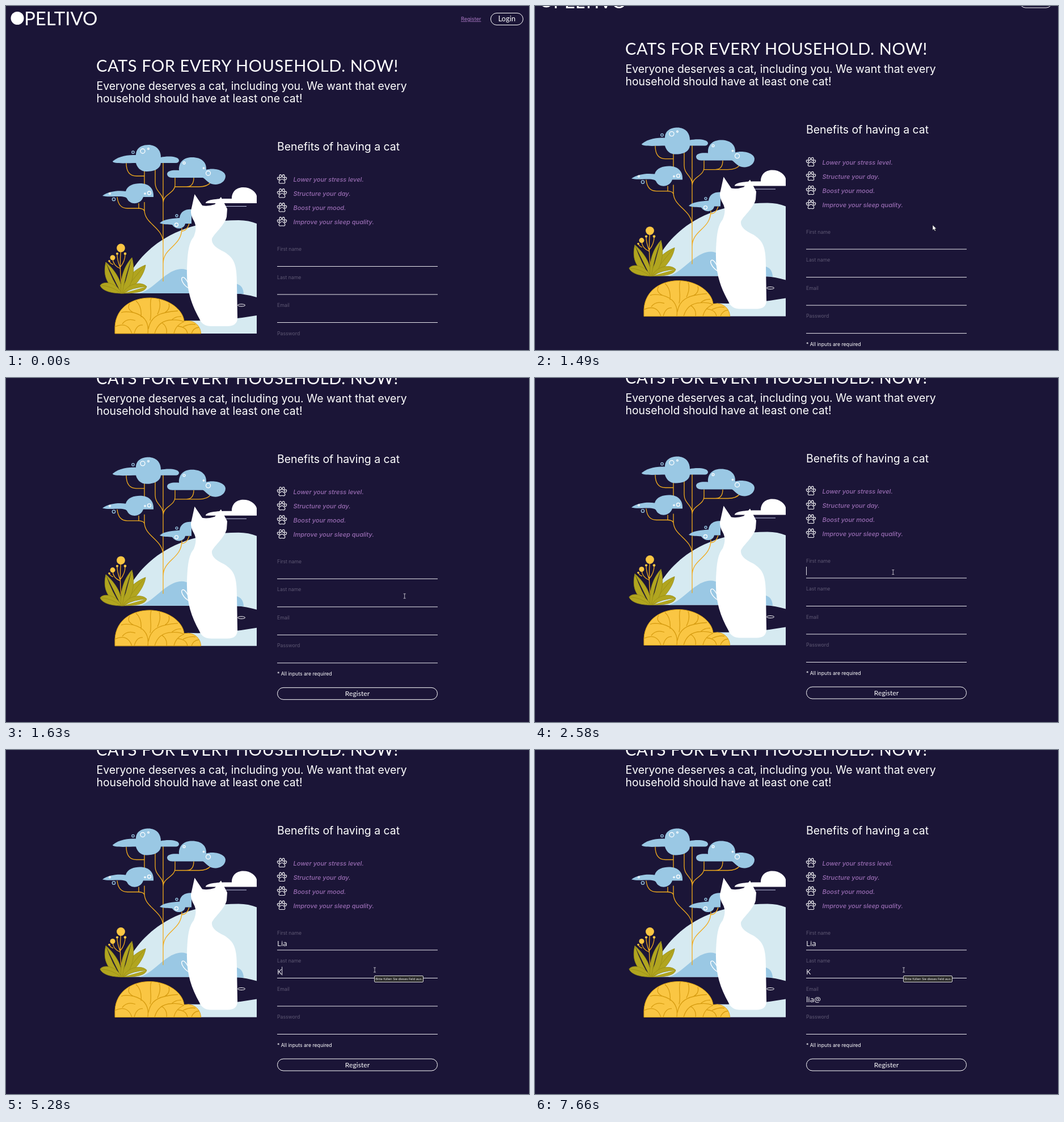
These frames come from a looping animation (922x607 px, 8 s). An HTML page:

```html
<!DOCTYPE html>
<html lang="en">
<head>
<meta charset="utf-8">
<title>Cats for every household</title>
<style>
  html, body { margin: 0; width: 100%; height: 100%; overflow: hidden; background: #1b1537; }
  svg { display: block; width: 922px; height: 607px; }
  text { font-family: Inter, "Open Sans", sans-serif; fill: #fff; }
  .round { font-family: Lato, sans-serif; }
  .typed, .tip text { font-family: "Open Sans", "Noto Sans", sans-serif; }
  .big { font-size: 19.4px; }
  .small { font-size: 8.7px; }
  .label { fill: #5f5974; }
  .benefit { font-size: 11px; font-weight: 500; font-style: italic; fill: #9a6db4; }
  .link { font-size: 9px; font-weight: 500; fill: #9a6db4; text-decoration: underline; }
  .button { text-anchor: middle; letter-spacing: .1px; }
  .typed { font-size: 13.3px; }
  .outline { fill: none; stroke: #fff; }
  .blue { fill: #9ac8e4; }
  .pale { fill: #d6eaf1; }
  .branch { fill: none; stroke: #f0aa1d; stroke-width: 1.3; }
  .vein { fill: none; stroke: #d79d12; stroke-width: 1.3; }
  .gold { fill: #fac643; }
  .leaf { fill: #b1a51f; stroke: #968b16; stroke-width: .8; }
</style>
</head>
<body>
<svg viewBox="0 0 922 607">
  <defs>
    <g id="paw" class="outline" stroke-width="1.1">
      <ellipse cx="-6.2" cy="-1" rx="1.8" ry="2.4" transform="rotate(-20 -6.2 -1)"/>
      <ellipse cx="-2.6" cy="-5.3" rx="1.9" ry="2.6"/>
      <ellipse cx="2.6" cy="-5.3" rx="1.9" ry="2.6"/>
      <ellipse cx="6.2" cy="-1" rx="1.8" ry="2.4" transform="rotate(20 6.2 -1)"/>
      <path d="M0 0C3 0 6.2 4 5.2 6.5C4.2 8.5 2 7.2 0 7.2S-4.2 8.5-5.2 6.5C-6.2 4-3 0 0 0Z"/>
    </g>
  </defs>

  <g id="page">
    <circle cx="20" cy="21.5" r="11.5" fill="#fff"/>
    <text class="round" x="32" y="34" font-size="33">PELTIVO</text>
    <text class="link" x="802" y="26">Register</text>
    <rect class="outline" x="854.5" y="12.5" width="57" height="21" rx="10.5"/>
    <text class="round button" x="883" y="27" font-size="12.8">Login</text>

    <text class="round" x="159" y="116" font-size="29" letter-spacing=".6">CATS FOR EVERY HOUSEHOLD. NOW!</text>
    <text class="big" x="159.5" y="148">Everyone deserves a cat, including you. We want that every</text>
    <text class="big" x="159.5" y="170">household should have at least one cat!</text>
    <text class="big" x="478" y="255">Benefits of having a cat</text>

    <g id="scene">
      <path class="pale" d="M205 507C215 460 270 378 410 378Q428 378 442 384V514Q425 509 405 507Z"/>
      <path class="blue" d="M235 507C262 500 282 464 310 464C330 464 345 490 350 507ZM405 490Q418 492 419 508H405Z"/>
      <path class="pale" d="M320 555Q380 557 442 546V578H320Z"/>
      <ellipse class="outline" cx="415" cy="528" rx="6.5" ry="2"/>
      <path fill="#fff" d="M352 347C356 340 380 340 398 340C398 326 408 320 418 320C432 320 440 328 442 335V348H352Z"/>
      <path d="M384 353.5H424" stroke="#c3c8e6"/>

      <path class="branch" d="M277 276V486M263 276V312C263 328 277 330 277 345M298 303V316C298 330 277 332 277 347
        M212 277Q212 300 230 300H244M244 290V318M331 303Q331 319 318 319H298M361 311Q355 319 340 319H318
        M244 346V360C244 385 277 390 277 418M196 337Q198 357 214 357H232Q243 357 244 362M234 348V357
        M310 392C310 425 277 425 277 455M323 384Q319 397 310 397"/>
      <g class="blue">
        <path d="M188 274C200 264 215 263 229 263C229 250 240 245 251 245C265 245 273 254 273 267C282 265 303 264 305 272C305 276 302 277 299 277H273C272 288 260 292 248 292C236 292 231 284 229 277C215 277 188 279 188 274Z"/>
        <path d="M284 296C285 290 295 289 305 290C304 274 315 267 328 267C345 267 354 276 353 289C365 285 386 289 387 300C387 310 377 315 369 315C357 315 352 305 347 303H293C287 303 284 300 284 296Z"/>
        <path d="M170 335C180 327 198 325 211 327C214 316 226 313 236 313C250 313 261 320 260 337H242C238 350 220 352 214 341C212 336 205 336 196 336C186 336 178 337 170 335Z"/>
        <path d="M271 383C280 375 295 375 306 374C307 362 318 358 327 359V384H316C314 394 300 396 293 386C286 385 277 386 271 383Z"/>
      </g>
      <g id="bubbles" fill="none" stroke-width="1.3"></g>

      <path class="branch" d="M203 488Q200 460 202.5 430M201 463Q189 458 188 446M201 461Q196 448 196 438M202 460Q210 450 210 438M189 456Q184 455 182 450"/>
      <g class="gold">
        <circle cx="202.5" cy="427" r="7.4"/><circle cx="188" cy="444" r="4.5"/>
        <circle cx="196" cy="437" r="2.1"/><circle cx="210" cy="437" r="2.3"/><circle cx="182" cy="450" r="1.8"/>
      </g>
      <g class="leaf">
        <path d="M202 507C170 490 173 466 176 452C190 464 206 485 204 507ZM176 452Q187 485 203 507"/>
        <path d="M207 507C225 500 244 475 246 457C230 463 207 480 204 507ZM246 457Q224 480 207 507"/>
        <path d="M203 507C200 475 212 455 222 444C229 470 222 495 207 507ZM222 444Q210 475 205 507"/>
        <path d="M203 507C190 507 170 504 166 493C172 484 195 488 204 507ZM167 493Q187 494 203 507"/>
        <path d="M206 507C215 488 240 486 248 495C246 504 230 507 206 507ZM248 495Q225 496 206 507"/>
      </g>

      <path class="gold" d="M192 578V566C194 530 225 515 253 515C285 515 312 535 314 556C330 553 343 563 343.5 578Z" stroke="#d79d12"/>
      <path class="vein" d="M250 578C253 555 240 545 225 541Q210 538 203 541M251 570C255 545 275 540 303 538M254 555C258 540 252 528 256 515
        M238 549Q240 530 229 520M225 541Q212 535 218 525M267 544Q274 530 270 518M280 541Q290 535 287 525M192 566Q215 556 222 578
        M205 561Q213 550 228 555M226 578Q230 562 241 563M262 578Q268 555 292 554Q305 553 313 557M275 559Q285 566 283 578M292 554Q300 547 309 548
        M296 578Q299 563 314 557M303 565Q318 566 320 578M312 566Q325 560 334 562M327 578Q330 568 340 567"/>

      <path class="outline" stroke-width="1.4" d="M322 498C312 492 307 481 311 479C314 477 319 484 322 491"/>
      <path fill="#fff" d="M332.5 332L327 357C325 362 326 368 329 375C337 388 335 396 331 407C322 418 320 435 319 465C318 500 326 525 341 552Q346 565 362 565H390Q408 565 408 550L407 490C407 455 402 445 385 434C370 427 362 420 363 411C366 402 385 388 389 372L390 358L379 337L368 350Q356 354 346 352Z"/>
    </g>

    <g id="benefits"></g>
    <g id="form"></g>
    <rect id="caret" width="1" height="15" fill="#e4e2ea"/>
    <text class="small" x="478" y="630.5">* All inputs are required</text>
    <rect class="outline" x="478.5" y="651.5" width="282" height="21" rx="10.5"/>
    <text class="round button" x="619.5" y="666" font-size="12">Register</text>
  </g>

  <g id="tooltip" class="tip">
    <rect x="649.5" y="398.5" width="86" height="11" rx="1.5" fill="#2b2b2b" stroke="#d8d8d8"/>
    <text x="651.3" y="406.4" font-size="5.8">Bitte füllen Sie dieses Feld aus.</text>
  </g>
  <path id="arrow" d="M0 0V9L2.2 7.2L3.8 10.6L5.4 9.9L3.9 6.6H6.6Z" fill="#fff" stroke="#111" stroke-width=".5"/>
  <path id="beam" d="M-2-4H2M-2 4H2M0-4V4" fill="none" stroke="#c9c6d0" stroke-width=".9"/>
</svg>
<script>
const LOOP = 8000, SCROLL = 106.5, ROW = 49.5, BLINK = 530;
const $ = id => document.getElementById(id);
const show = (el, on) => el.style.display = on ? '' : 'none';

$('benefits').innerHTML = ['Lower your stress level.', 'Structure your day.', 'Boost your mood.', 'Improve your sleep quality.']
  .map((line, i) => `<use href="#paw" x="486.5" y="${305.5 + 25 * i}"/>
    <text class="benefit" x="506.5" y="${310 + 25 * i}">${line}</text>`).join('');

$('form').innerHTML = ['First name', 'Last name', 'Email', 'Password']
  .map((label, i) => `<g transform="translate(0 ${ROW * i})">
    <text class="small label" x="478" y="432">${label}</text>
    <text class="typed" x="478" y="452.5"></text>
    <path d="M478 459.5H761" stroke="#e9e8ee"/></g>`).join('');
const inputs = [...document.querySelectorAll('.typed')];

const ring = color => ([x, y, r]) => `<circle cx="${x}" cy="${y}" r="${r}" stroke="${color}"/>`;
$('bubbles').innerHTML =
  [[241, 256, 4], [251, 252, 1.4], [314, 277, 2], [356.5, 295, 4], [348.5, 286, 1.2],
   [183, 331, 1.4], [252.5, 330, 3], [245, 331, 1.2], [300.5, 386, 3]].map(ring('#fff')).join('') +
  [[224, 258, 2.2], [190, 341, 2.7], [301, 370, 2]].map(ring('#9ac8e4')).join('');

// time, x, y
const pointerPath = [
  [730, 627, 553], [1080, 701, 386.5], [1500, 701, 386.5], [1630, 703, 385], [1840, 631, 342],
  [2110, 631, 342], [2180, 624, 341], [2250, 624, 341], [2320, 631, 342], [2570, 631, 342],
  [3340, 650, 384], [4150, 650, 388]
];
// time, field, its text, start of the caret blink
const typing = [
  [2110, 0, '', 2110], [3410, 0, 'L', 3410], [3620, 0, 'Li', 3410], [3820, 0, 'Lia', 3410],
  [4410, 1, '', 4410], [5280, 1, 'K', 5280], [5540, 2, '', 5540], [6070, 2, 'l', 6070],
  [6270, 2, 'li', 6070], [6400, 2, 'lia', 6070], [7330, 2, 'lia@', 6070]
];

function pointerAt(t) {
  const next = pointerPath.findIndex(p => p[0] > t);
  if (next < 0) return pointerPath.at(-1).slice(1);
  const [t0, x0, y0] = pointerPath[next - 1], [t1, x1, y1] = pointerPath[next];
  const k = (t - t0) / (t1 - t0);
  return [x0 + (x1 - x0) * k, y0 + (y1 - y0) * k];
}

function drawPointer(t, scroll) {
  const visible = t >= 730;
  const [x, y] = visible ? pointerAt(t) : [0, 0];
  const row = (y + scroll - 438.5) / ROW;
  const overInput = row >= 0 && row < 4 && row % 1 < 21 / ROW;
  show($('arrow'), visible && !overInput);
  show($('beam'), visible && overInput);
  for (const id of ['arrow', 'beam']) $(id).setAttribute('transform', `translate(${x} ${y})`);
}

function drawTyping(t) {
  const done = typing.filter(e => e[0] <= t), last = done.at(-1);
  inputs.forEach((el, i) => el.textContent = done.filter(e => e[1] === i).at(-1)?.[2] ?? '');
  show($('caret'), last && Math.floor((t - last[3]) / BLINK) % 2 === 0);
  if (!last) return;
  $('caret').setAttribute('x', 478 + inputs[last[1]].getComputedTextLength());
  $('caret').setAttribute('y', 439.5 + ROW * last[1]);
}

function draw(now) {
  const t = now % LOOP;
  const k = Math.min(1, Math.max(0, (t - 1406) / 241));
  const scroll = SCROLL * k * k * (3 - 2 * k);
  $('page').setAttribute('transform', `translate(0 ${-scroll})`);
  drawTyping(t);
  show($('tooltip'), t >= 4680);
  drawPointer(t, scroll);
  requestAnimationFrame(draw);
}
requestAnimationFrame(draw);
</script>
</body>
</html>
```
